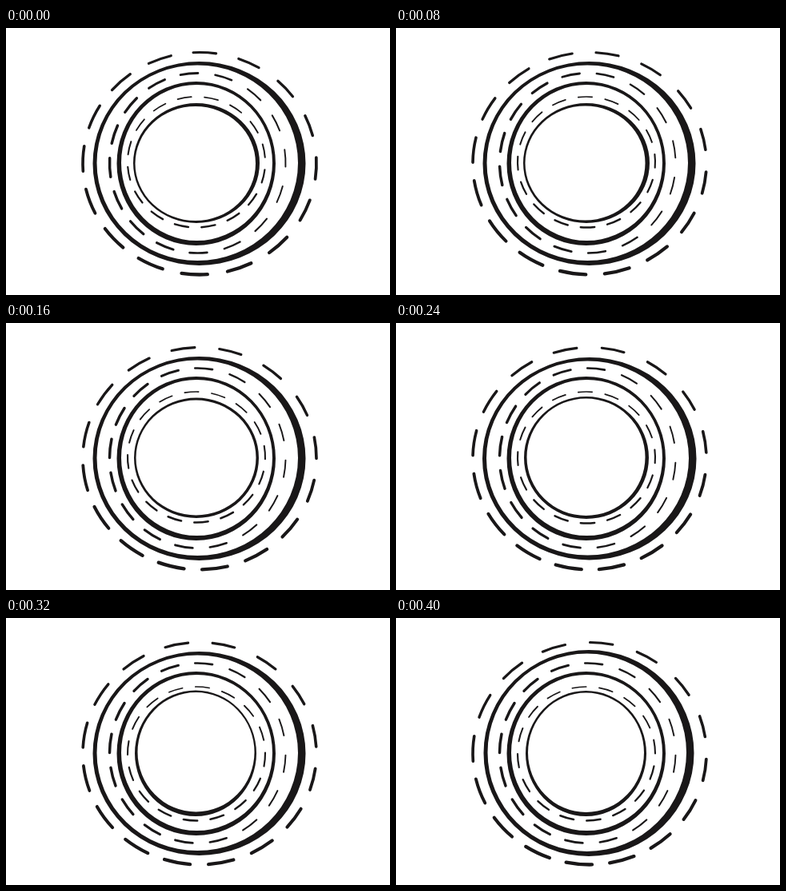
Animation of 480 by 334 pixels, one loop 480 ms. Source, as an HTML page with a canvas:

```html
<!DOCTYPE html>
<html lang="en">
<head>
<meta charset="utf-8">
<title>Wobbling rings</title>
<style>
html, body { margin: 0; height: 100%; overflow: hidden; background: #fff; }
canvas { display: block; }
</style>
</head>
<body>
<canvas id="stage" width="480" height="334"></canvas>
<script>
const ctx = document.getElementById('stage').getContext('2d');
const STEP = 80, RAD = Math.PI / 180;

// Start angle of each dashed circle, uneven spacing of the widest one,
// stretch of the largest ring and the [left, top, right, bottom] edges
// of the smallest ring.
const poses = [
  { wide: -87.5, warp: 0,   mid: -93,   small: -100, lift: 0,  outer: [159, 94, 317, 244],   inner: [161.5, 98, 312, 241] },
  { wide: -81.5, warp: 1.5, mid: -98.5, small: -91,  lift: 0,  outer: [159, 94, 317, 244],   inner: [161.5, 97.5, 311.5, 240.5] },
  { wide: -75.3, warp: 2.3, mid: -83.5, small: -94,  lift: 0,  outer: [160, 93.5, 316, 244], inner: [162.5, 96.5, 312.5, 240.5] },
  { wide: -79,   warp: 3,   mid: -82,   small: -91,  lift: -1, outer: [160, 92, 316, 245],   inner: [163.5, 94.5, 311.5, 241] },
  { wide: -78.5, warp: 2,   mid: -83.5, small: -85,  lift: 0,  outer: [161, 90.5, 313, 248], inner: [164.5, 93, 310.5, 242.5] },
  { wide: -84.5, warp: 3,   mid: -83.5, small: -96,  lift: 2,  outer: [162, 91, 313, 248],   inner: [165, 93.5, 310, 243] }
];

function oval([l, t, r, b]) {
  ctx.moveTo(r, (t + b) / 2);
  ctx.ellipse((l + r) / 2, (t + b) / 2, (r - l) / 2, (b - t) / 2, 0, 0, 2 * Math.PI);
}

function ring(outer, inner) {
  ctx.beginPath();
  oval(outer);
  oval(inner);
  ctx.fill('evenodd');
}

// warp, half and width are functions of the angle in degrees
function dashes(cx, cy, rx, ry, start, warp, half, width) {
  for (let i = 0; i < 16; i++) {
    const base = start + i * 22.5;
    const a = base + warp(base), h = half(a);
    ctx.lineWidth = width(a);
    ctx.beginPath();
    ctx.ellipse(cx, cy, rx, ry, 0, (a - h) * RAD, (a + h) * RAD);
    ctx.stroke();
  }
}

const cos = deg => Math.cos(deg * RAD);
const sin = deg => Math.sin(deg * RAD);

function draw(p) {
  ctx.fillStyle = '#fff';
  ctx.fillRect(0, 0, 480, 334);
  ctx.fillStyle = ctx.strokeStyle = '#191718';
  ctx.lineCap = 'round';

  const l = 108.5 + p.lift / 2, t = 42 - p.lift, r = 374.5 - p.lift, b = 297 + p.lift / 2;
  ring([l, t, r, b], [l + 5, t + 4.5, r - 9.5, b - 6]);
  ring([138.5, 67, 337, 272], [144, 71, 333, 266]);
  ring(p.outer, p.inner);

  dashes(242, 169.5, 146, 139, p.wide,
    a => p.warp * cos(a), a => 6 - 0.6 * cos(a + 35), a => 3.7 + 0.6 * sin(a));
  dashes(239.5, 169, 110, 112.5, p.mid,
    a => 2.5 * sin(a), a => 5.7 - 0.3 * cos(a), a => 2.7 - 0.8 * cos(a));
  const low = p.outer[3] + 5.5;
  dashes(238, (86 + low) / 2, 86, (low - 86) / 2, p.small,
    () => 0, () => 5.8, a => 2.1 + 0.4 * sin(a));
}

function frame(now) {
  draw(poses[Math.floor(now / STEP) % poses.length]);
  requestAnimationFrame(frame);
}
requestAnimationFrame(frame);
</script>
</body>
</html>
```
